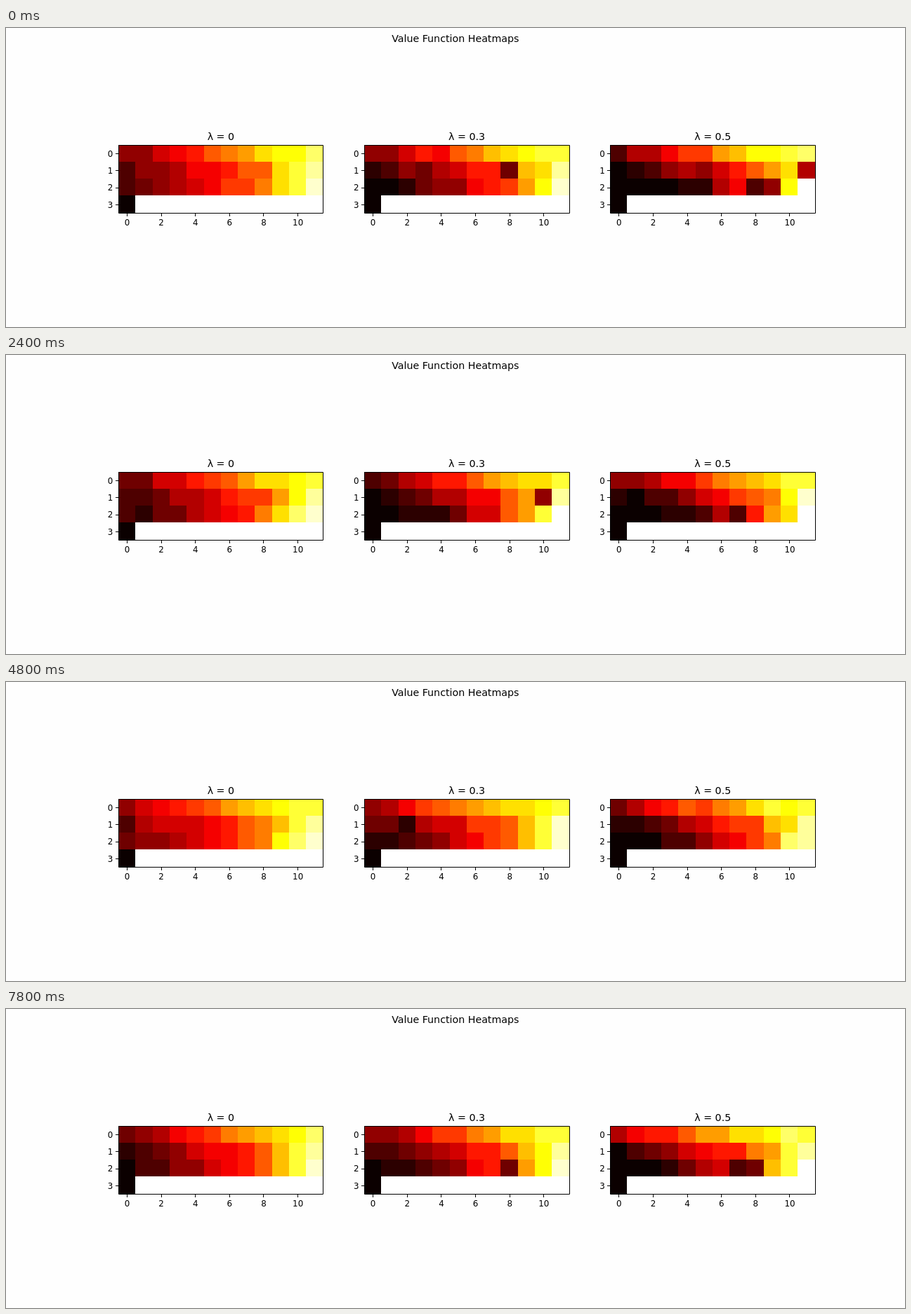
Recreate the animation shown at these times as an HTML page. Size 1280 px wide and 427 px high, loop 8 s.

```html
<!DOCTYPE html>
<html lang="en">
<head>
<meta charset="utf-8">
<title>Value Function Heatmaps</title>
<style>
  html, body { margin: 0; width: 100%; height: 100%; overflow: hidden; background: #fefefe; }
  svg { display: block; width: 1280px; height: 427px; font-family: "DejaVu Sans", sans-serif; }
</style>
</head>
<body>
<svg id="stage" viewBox="0 0 1280 427"></svg>
<script>
const STEP_MS = 200, STEPS = 40;
const COLS = 12, ROWS = 4, CELL_W = 24.3, CELL_H = 24.15, TOP = 167;

// Average value along each row, pinned at four columns.
const KNOTS = [0, 4, 8, 11];
const ROW_CURVES = [[13, 38, 67, 82], [7, 27, 49, 90], [5, 22, 52, 96]];

// How far each panel's values lie above or below average over time.
const MOOD_STEPS = [0, 8, 16, 24, 28, 34, 39];
const PANELS = [
  { lambda: 0, mood: [5, 0, 0, 8, -28, 5, 0] },
  { lambda: 0.3, mood: [1, -13, 4, 7, 8, -22, 3] },
  { lambda: 0.5, mood: [-1, -3, -1, 2, -6, 0, 8] }
];

const stage = document.getElementById("stage");

function add(tag, attrs, text) {
  const el = document.createElementNS("http://www.w3.org/2000/svg", tag);
  for (const name in attrs) el.setAttribute(name, attrs[name]);
  if (text !== undefined) el.textContent = text;
  stage.append(el);
  return el;
}

function label(text, x, y, size, anchor = "middle") {
  add("text", { x, y, "font-size": size, "text-anchor": anchor }, text);
}

function line(d) {
  add("path", { d, fill: "none", stroke: "#000", "stroke-width": 1 });
}

function clamp(v, lo, hi) { return Math.max(lo, Math.min(hi, v)); }

function noise(a, b, c) {
  const s = Math.sin(a * 12.99 + b * 78.23 + c * 37.72) * 43758.55;
  return s - Math.floor(s);
}

function interpolate(xs, ys, x) {
  let i = 0;
  while (i < xs.length - 2 && x > xs[i + 1]) i++;
  return ys[i] + (ys[i + 1] - ys[i]) * (x - xs[i]) / (xs[i + 1] - xs[i]);
}

// The "hot" colour map for v in 0..1.
function hot(v) {
  const ramp = (lo, hi, base) => Math.round(255 * clamp(base + (1 - base) * (v - lo) / (hi - lo), 0, 1));
  return `rgb(${ramp(0, 0.365, 0.0416)},${ramp(0.365, 0.746, 0)},${ramp(0.746, 1, 0)})`;
}

// Value of one cell; a larger lambda gives darker lower rows, more noise and more dips.
function cellValue({ lambda, mood }, step, r, c) {
  if (r === 3) return 0;
  const id = r * COLS + c + 100 * lambda;
  if (r === 2 && c === COLS - 1 && noise(step, id, 1) < lambda) return 1;
  const shift = interpolate(MOOD_STEPS, mood, step) + lambda * (8 - 18 * r);
  let v = interpolate(KNOTS, ROW_CURVES[r], c) + shift * (1 - (c / 11) ** 3);
  v += (6 + 10 * lambda) * (noise(step, id, 2) - 0.5);
  if (r > 0 && noise(step, id, 3) < 0.2 * lambda) v *= 0.3;
  return clamp(Math.round(v / 5) * 5, 0, 95) / 100;
}

function addPanel({ lambda }, index) {
  const x = 160 + 350.17 * index;
  const edgeX = c => Math.round(Math.floor(x) + c * CELL_W);
  const edgeY = r => Math.round(TOP + r * CELL_H);
  const cells = [];
  add("rect", { x, y: TOP, width: 291, height: 97, fill: "#fff" });
  for (let r = 0; r < ROWS; r++) {
    for (let c = 0; c < (r < 3 ? COLS : 1); c++) {
      const el = add("rect", {
        x: edgeX(c), y: edgeY(r),
        width: edgeX(c + 1) - edgeX(c), height: edgeY(r + 1) - edgeY(r),
        "shape-rendering": "crispEdges"
      });
      cells.push({ r, c, el });
    }
  }
  const left = Math.floor(x) + 0.5, right = Math.floor(x + 291.85) + 0.5;
  line(`M${left} 167.5H${right}V264.5H${left}Z`);
  for (let c = 0; c < COLS; c += 2) {
    const tx = x + (c + 0.5) * 24.32;
    line(`M${Math.floor(tx + 0.25) + 0.5} 265v4`);
    label(c, tx + 0.3, 282, 11.85);
  }
  for (let r = 0; r < ROWS; r++) {
    const ty = 167.35 + (r + 0.5) * 24.3;
    line(`M${left - 4.5} ${Math.floor(ty) + 0.5}h4`);
    label(r, x - 7.6, Math.round(ty + 4.2), 11.85, "end");
  }
  label(`λ = ${lambda}`, x + 145.9, 160, 14.22);
  return cells;
}

label("Value Function Heatmaps", 639.8, 20, 14.22);
const grids = PANELS.map(addPanel);

function draw(step) {
  grids.forEach((cells, p) => {
    for (const { r, c, el } of cells) el.setAttribute("fill", hot(cellValue(PANELS[p], step, r, c)));
  });
}

const start = performance.now();
let shown = -1;
function tick() {
  const step = Math.floor((performance.now() - start) / STEP_MS) % STEPS;
  if (step !== shown) draw(shown = step);
  requestAnimationFrame(tick);
}
tick();
</script>
</body>
</html>
```
